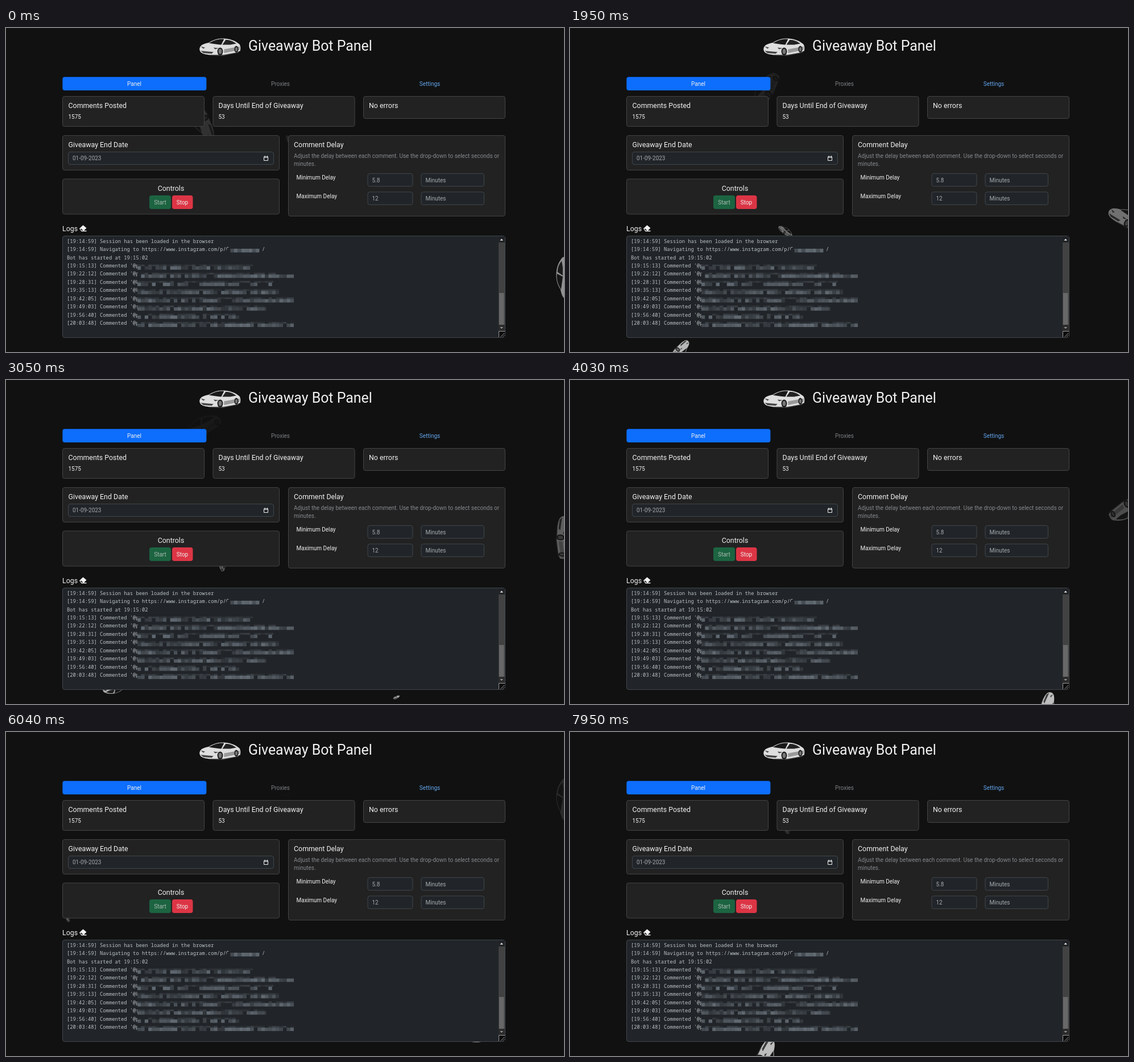
Animation of 981x571 px, one loop 8000 ms. Source, as an HTML page:

```html
<!DOCTYPE html>
<html lang="en">
<head>
<meta charset="utf-8">
<title>Giveaway Bot Panel</title>
<style>
  html, body { margin: 0; width: 100%; height: 100%; overflow: hidden; background: #111; }
  svg { display: block; width: 981px; height: 571px; font: 10px Roboto, sans-serif; }
  text { fill: #f1f1f1; }
  .title { font-size: 24.9px; }
  .heading { font-size: 12.4px; }
  .mid { text-anchor: middle; }
  .muted { fill: #85898d; }
  .value { fill: #a4abb1; }
  .card { fill: #222; stroke: #444; }
  .input { fill: #212529; stroke: #40464d; }
  #log text { font: 8.8px "Noto Sans Mono", monospace; fill: #bcc2c7; white-space: pre; }
</style>
</head>
<body>
<svg viewBox="0 0 981 571">
  <defs>
    <g id="car">
      <path fill="#3a3a3a" d="M-34 9L-20 15 5 16 34 10 30 5-30 6Z"/>
      <path fill="#dedede" d="M-37 3C-36-4-29-6-20-8C-9-15 1-16 10-15C21-14 28-10 32-7C37-5 37 2 36 7L29 10 6 14-19 14C-32 13-37 10-37 3Z"/>
      <path fill="#191919" d="M-20-7C-10-13-2-15 7-14L2-4C-6-5-13-6-20-7Z"/>
      <path fill="#222" d="M4-4L10-13C18-13 24-10 29-6L18-4Z"/>
      <path fill="#999" d="M7 4L35-1 35 5 7 11Z"/>
      <path fill="#444" d="M-35-1L-27 1-30 3ZM-12 1L-3 2-9 4ZM-35 7L-12 9-15 12-30 11Z"/>
      <ellipse cx="0" cy="8" rx="5" ry="7" fill="#1b1b1b"/>
      <ellipse cx="0" cy="8" rx="3" ry="4.6" fill="#777"/>
      <ellipse cx="29" cy="4" rx="3.6" ry="6" fill="#1b1b1b"/>
      <ellipse cx="29" cy="4" rx="2" ry="3.8" fill="#777"/>
    </g>
  </defs>

  <g id="floaters"></g>

  <use href="#car" transform="translate(376.5 33.5) scale(.98)"/>
  <text x="426" y="40" class="title">Giveaway Bot Panel</text>

  <rect x="99.4" y="86.2" width="253" height="23.8" rx="4" fill="#0d6efd"/>
  <text x="225.5" y="101.5" class="mid">Panel</text>
  <text x="482.5" y="101.5" class="mid" style="fill:#7c8084">Proxies</text>
  <text x="745" y="101.5" class="mid" style="fill:#62a5ec">Settings</text>

  <g id="boxes"></g>

  <text x="109.5" y="141" class="heading">Comments Posted</text>
  <text x="109.5" y="160">1575</text>
  <text x="373.5" y="141" class="heading">Days Until End of Giveaway</text>
  <text x="373.5" y="160">53</text>
  <text x="638" y="141" class="heading">No errors</text>

  <text x="109.5" y="210" class="heading">Giveaway End Date</text>
  <text x="117" y="233" class="value">01-09-2023</text>
  <path d="M453.5 227h7v6.5h-7zM455 225v2M459.500 225v2M453 228h8" fill="none" stroke="#eee"/>

  <text x="290" y="287" class="heading mid">Controls</text>
  <rect x="252" y="295" width="38" height="24" rx="4" fill="#1c6441"/>
  <text x="271" y="310.5" class="mid" style="fill:#a9b8b0">Start</text>
  <rect x="292" y="295" width="36.5" height="24" rx="4" fill="#dc3545"/>
  <text x="310" y="310.5" class="mid">Stop</text>

  <text x="506" y="210" class="heading">Comment Delay</text>
  <text x="506" y="228.5" class="muted">Adjust the delay between each comment. Use the drop-down to select seconds or</text>
  <text x="506" y="242.5" class="muted">minutes.</text>
  <text x="510.5" y="267">Minimum Delay</text>
  <text x="510.5" y="299.5">Maximum Delay</text>
  <text x="643.5" y="271.5" class="value">5.8</text>
  <text x="643.5" y="303.5" class="value">12</text>
  <text x="737.5" y="271.5" class="value">Minutes</text>
  <text x="737.5" y="303.5" class="value">Minutes</text>

  <text x="99" y="357.5" class="heading">Logs</text>
  <path d="M129 353.5L135.5 347.5 141.5 352.5 137 357H141.5V358.5H132.5Z" fill="#f1f1f1"/>
  <path d="M132 353.5L135.5 357H133.2L130.8 354.5Z" fill="#111"/>

  <g id="log"></g>
  <g id="mosaic"></g>

  <rect x="866" y="367" width="11" height="167" fill="#424242"/>
  <rect x="866" y="367" width="11" height="11" fill="#202326"/>
  <rect x="866" y="523" width="11" height="11" fill="#2b2b2b"/>
  <rect x="867" y="467" width="8.5" height="56" fill="#686868"/>
  <path d="M868.5 374.5h5.5l-2.7-3z" fill="#eee"/>
  <path d="M868.5 527h5.5l-2.7 3z" fill="#999"/>
  <path d="M866 534.5H877V545H866Z" fill="#0c0c0c"/>
  <path d="M866.5 545V534.5H877M869.5 544.5L876 538M873 544.5L876 541.5" fill="none" stroke="#bbb" stroke-width=".8"/>
</svg>

<script>
const NS = "http://www.w3.org/2000/svg";
const LOOP = 8000;

function add(parentId, tag, attributes, content = "") {
  const node = document.createElementNS(NS, tag);
  for (const key in attributes) node.setAttribute(key, attributes[key]);
  node.textContent = content;
  document.getElementById(parentId).append(node);
  return node;
}

function box(kind, x, y, width, height) {
  add("boxes", "rect", { class: kind, x: x + .5, y: y + .5, width: width - 1, height: height - 1, rx: 3.5 });
}

box("card", 99, 120, 250, 54);
box("card", 363.5, 120, 250, 54);
box("card", 628, 120, 250, 40);
box("card", 99, 189, 382, 62);
box("card", 99, 265.5, 382, 63);
box("card", 496, 189, 382, 143);
box("input", 109, 218, 362, 23);
for (const y of [256, 288.5]) {
  box("input", 635.5, y, 80, 23.5);
  box("input", 729.5, y, 111.5, 23.5);
}
box("input", 99, 366, 779, 180);

let seed = 7;
const random = () => (seed = seed * 16807 % 2147483647) / 2147483647;

function mosaicRow(left, right, y, height, strength) {
  for (let x = left; x < right; x += 6.4) {
    const level = random() < .14 ? 0 : (.25 + .75 * random()) * strength;
    const [r, g, b] = [33, 37, 41].map((base, i) => Math.round(base + level * (76 + i * 5)));
    add("mosaic", "rect", { x, y, width: Math.min(6.5, right - x), height, fill: `rgb(${r},${g},${b})` });
  }
}

// Each comment: time, first letter of the hidden handle, right end of the blurred part.
const comments = [
  ["19:15:13", "p", 434], ["19:22:12", "p", 506], ["19:28:31", "k", 470], ["19:35:13", "k", 480],
  ["19:42:05", "p", 506], ["19:49:03", "s", 458], ["19:56:40", "p", 410], ["20:03:48", "p", 506]
];
const lines = [
  "[19:14:59] Session has been loaded in the browser",
  "[19:14:59] Navigating to https://www.instagram.com/p/C           /",
  "Bot has started at 19:15:02",
  ...comments.map(([time, letter]) => `[${time}] Commented '@${letter}`)
];
const lineY = index => 378.7 + index * 14.43;
lines.forEach((line, i) => add("log", "text", { x: 107, y: lineY(i) }, line));

mosaicRow(388, 448, 389, 6.5, 1);
comments.forEach(([, , right], i) => {
  const y = lineY(i + 3) - 5;
  mosaicRow(231, right, y, 4, .35);
  mosaicRow(231, right, y + 3, 6, .85);
});

// Drifting cars: centre x, starting y, length, rise time and launch time in seconds.
const cars = [
  [983, 680, 76, 12, -4.5],
  [342, 700, 76, 25, -21.05],
  [342, 680, 76, 25, 3.95],
  [379, 713, 29, 20, -9.16],
  [193, 690, 47, 25, -2.74],
  [838, 680, 66, 25, .23],
  [108, 709, 16, 25, -8.9],
  [686.5, 700, 12, 25, -2.45],
  [750, 700, 13, 25, 1.6],
  [495, 741, 13, 45, -38.4]
].map(([x, y, length, duration, start]) => ({
  x, y, duration, start, scale: length / 74, node: add("floaters", "use", { href: "#car" })
}));

function draw(now) {
  const seconds = now % LOOP / 1000;
  for (const { x, y, duration, start, scale, node } of cars) {
    const progress = (seconds - start) / duration;
    const visible = progress >= 0 && progress <= 1;
    node.setAttribute("opacity", visible ? 1 - progress : 0);
    node.setAttribute("transform",
      `translate(${x} ${y - 639 * progress}) rotate(${720 * progress}) scale(${scale})`);
  }
}

const begin = performance.now();
function tick() {
  draw(performance.now() - begin);
  requestAnimationFrame(tick);
}
tick();
</script>
</body>
</html>
```
